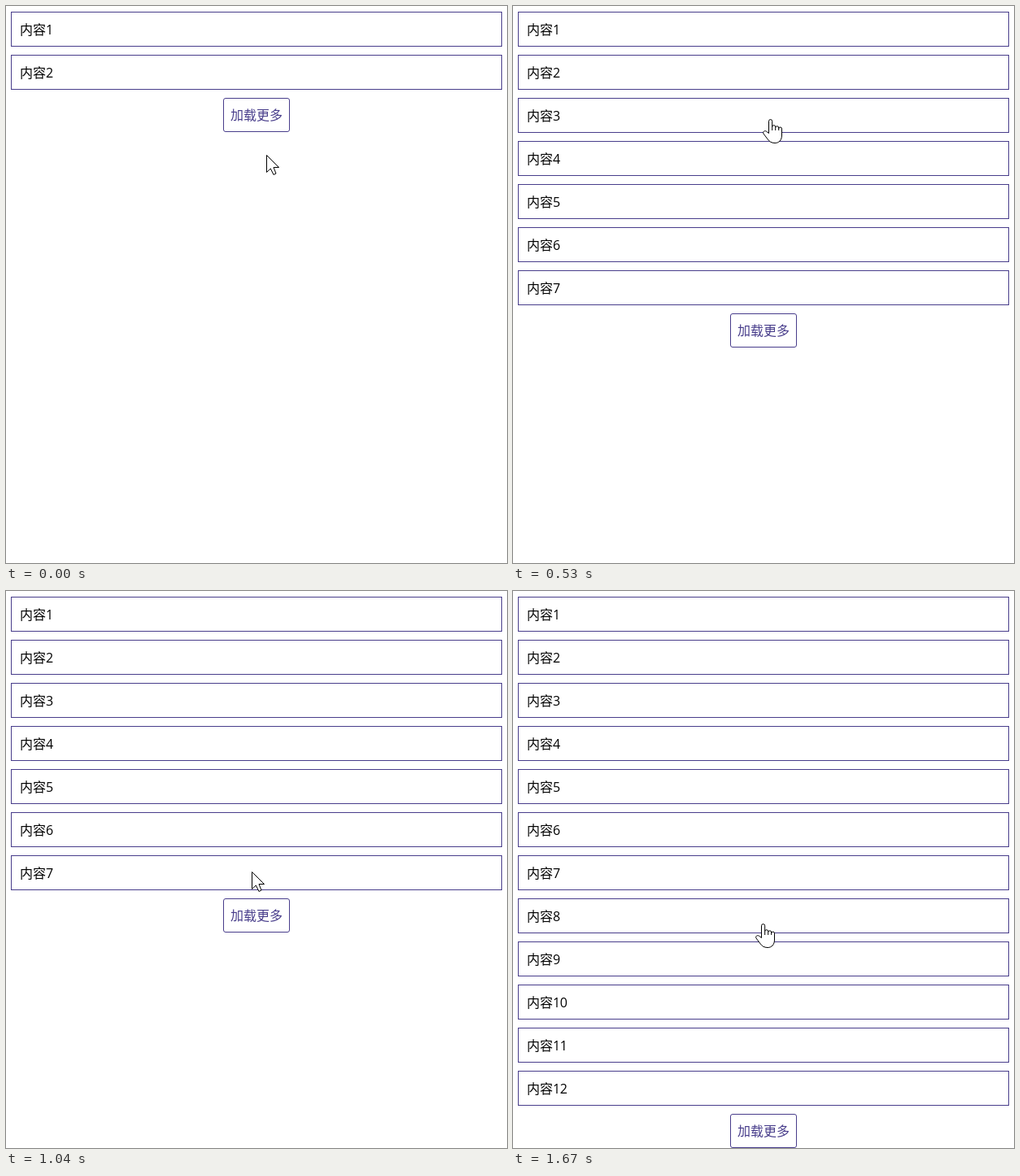
An HTML page for the animation above (2050 ms loop, 616x685 px).

```html
<!DOCTYPE html>
<html lang="zh-CN">
<head>
<meta charset="utf-8">
<title>加载更多</title>
<style>
  html, body { margin: 0; width: 100%; height: 100%; overflow: hidden; background: #fff; }
  svg { display: block; }
  rect { fill: none; stroke: #483d8b; }
  text { font: 350 16px "Noto Sans CJK SC", "Noto Sans CJK", sans-serif; }
  .digits { font-family: "Open Sans", "Noto Sans", sans-serif; font-weight: 400; letter-spacing: -.5px; }
  #more text { fill: #483d8b; }
  #cursor path { fill: #fff; stroke: #000; stroke-linejoin: round; }
</style>
</head>
<body>
<svg width="616" height="685" viewBox="0 0 616 685">
  <g id="rows"></g>
  <g id="more">
    <rect x="267.5" y=".5" width="81" height="41" rx="2.5"/>
    <text x="276" y="27">加载更多</text>
  </g>
  <g id="cursor">
    <path id="arrow" d="M.5 .5V21.5L5.3 17L9 24.5L12 23L9 15.5H15.5Z"/>
    <path id="hand" transform="translate(-7)" d="M7.5 17.5V2.7a2.1 2.1 0 0 1 4.2 0V9.6a2 2 0 0 1 4 .2v.8a2 2 0 0 1 4 .4v.8a1.9 1.9 0 0 1 3.8 .3V20C23.5 26 20 29.5 15 29.5C10.5 29.5 8 27.5 5.5 24L1 18C-.3 15.5 2.5 13.8 4.5 15.2ZM11.7 9.5V14M15.7 10.5V14M19.7 11.5V14"/>
  </g>
</svg>
<script>
const LOOP = 2050, PITCH = 53, TOP = 7;
const START = 26, TICK = 63.15;            // the pointer moves once per tick
const PRESS = 420, LOADS = [530, 1670];    // each load adds five rows

// pointer path: tick, x, y
const path = [
  [0, 320, 183], [4, 314, 139], [10, 314, 139],
  [14, 302, 263], [17, 302, 386], [18, 304, 398], [20, 305, 409]
];
const REST = path[2][0], END = path[path.length - 1][0];

const $ = id => document.getElementById(id);
const place = (el, x, y) => el.setAttribute('transform', `translate(${x} ${y})`);
const show = (el, on) => el.setAttribute('visibility', on ? 'visible' : 'hidden');
const buttonTop = count => TOP + count * PITCH;

$('rows').innerHTML = Array.from({ length: 12 }, (_, i) => `
  <g transform="translate(0 ${TOP + i * PITCH})">
    <rect x="6.5" y=".5" width="603" height="42"/>
    <text x="17" y="28">内容<tspan class="digits">${i + 1}</tspan></text>
  </g>`).join('');
const rows = [...$('rows').children];

function pointerAt(tick) {
  const next = Math.max(1, path.findIndex(p => p[0] >= tick));
  const [t0, x0, y0] = path[next - 1], [t1, x1, y1] = path[next];
  const k = (tick - t0) / (t1 - t0);
  return [x0 + (x1 - x0) * k, y0 + (y1 - y0) * k].map(Math.round);
}

function draw(t) {
  const count = 2 + 5 * LOADS.filter(load => t >= load).length;
  rows.forEach((row, i) => show(row, i < count));
  place($('more'), 0, buttonTop(count));

  const tick = Math.min(END, Math.max(0, Math.floor((t - START) / TICK)));
  const [x, y] = pointerAt(tick);
  place($('cursor'), x, y);

  // the pointer shape only refreshes on a move, so it outlives the button's jump
  const top = buttonTop(tick <= REST ? 2 : 7);
  const pressed = t >= PRESS && t < LOADS[0];
  const hand = y >= top && y < top + 42 && !pressed;
  show($('arrow'), !hand);
  show($('hand'), hand);
}

const start = performance.now();
function frame() {
  draw((performance.now() - start) % LOOP);
  requestAnimationFrame(frame);
}
frame();
</script>
</body>
</html>
```
